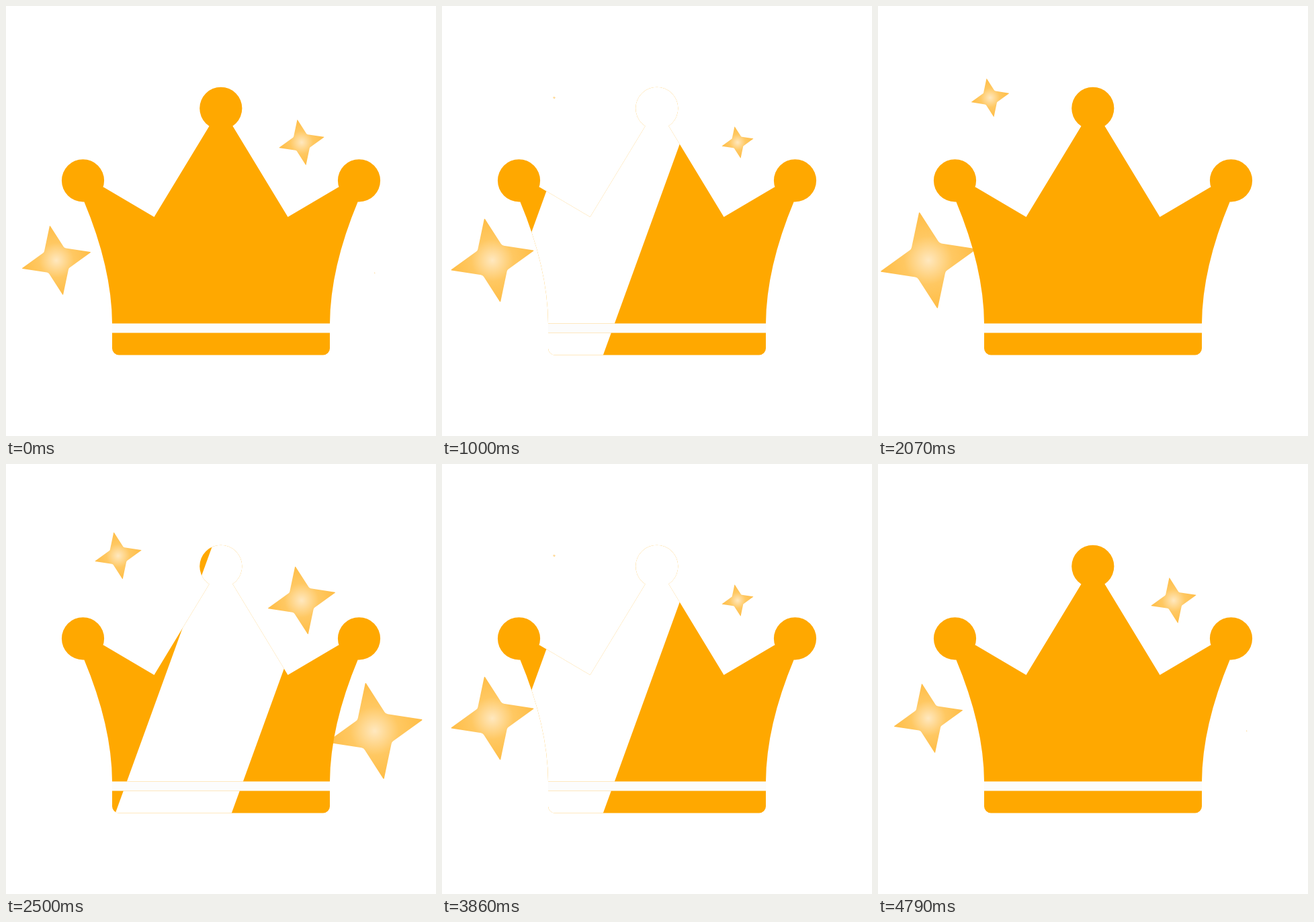
Animation of 640x640 px, one loop 4.87 s. Source, as an HTML page with a canvas:

```html
<!DOCTYPE html>
<html lang="en">
<head>
<meta charset="utf-8">
<title>Sparkling crown</title>
<style>
  html, body { margin: 0; width: 100%; height: 100%; overflow: hidden; background: #fff; }
  canvas { display: block; width: 640px; height: 640px; }
</style>
</head>
<body>
<canvas id="stage" width="640" height="640"></canvas>
<script>
const ctx = document.getElementById('stage').getContext('2d');

const LOOP = 4870;
const TICK = 1000 / 14;
const LAST_TICK = 67;
const GOLD = '#ffa800';

// Twinkle times are in steps; a tick is 1.5 steps and a cycle is 20.
const STEPS_PER_TICK = 1.5;
const CYCLE = 20;
const GROW = 6.8;
const SHRINK = 7;
const stars = [
  { x: 75, y: 378.5, start: -4.9, end: 10.75 },
  { x: 167, y: 136.5, start: 0.8, end: 15.9 },
  { x: 440, y: 203, start: 7.7, end: 23.3 },
  { x: 548.7, y: 397.3, start: 4.8, end: 20.1 }
];

// The gleam is a slanted band crossing the crown once every 20 ticks.
const SWEEP = { period: 20, speed: 96, width: 173, slope: 0.363, baseY: 519 };

function makeCrown() {
  const path = new Path2D();
  for (const [x, y] of [[319.8, 152.3], [114.5, 259.8], [525.5, 259.8]]) {
    path.moveTo(x + 31.6, y);
    path.arc(x, y, 31.6, 0, Math.PI * 2);
  }
  path.moveTo(114.5, 260);
  path.lineTo(145, 269.5);
  path.lineTo(220.5, 314);
  path.lineTo(303, 178);
  path.lineTo(337, 178);
  path.lineTo(419.5, 314);
  path.lineTo(495, 269.5);
  path.lineTo(525.5, 260);
  path.lineTo(523.8, 291);
  path.quadraticCurveTo(482.5, 390, 482, 472.5);
  path.lineTo(158, 472.5);
  path.quadraticCurveTo(157.5, 390, 116.2, 291);
  path.closePath();
  path.roundRect(158, 486.5, 324, 33, [0, 0, 10, 10]);
  return path;
}

function makeStar() {
  const points = [
    [-13.7, -72.5], [16.5, -25.5], [72, -17], [25.5, 16.5],
    [13.7, 72.5], [-16.5, 25.5], [-72, 17], [-25.5, -16.5]
  ];
  const path = new Path2D();
  path.moveTo(-19.6, -44.5);
  points.forEach(([x, y], i) => {
    const [nx, ny] = points[(i + 1) % points.length];
    path.arcTo(x, y, nx, ny, i % 2 ? 7 : 0.8);
  });
  path.closePath();
  return path;
}

function makeGlow() {
  const glow = ctx.createRadialGradient(0, 0, 0, 0, 0, 72);
  glow.addColorStop(0, '#ffe8bf');
  glow.addColorStop(0.5, '#ffc862');
  glow.addColorStop(1, '#ffbd46');
  return glow;
}

const crown = makeCrown();
const starShape = makeStar();
const glow = makeGlow();

function starScale(star, step) {
  const age = (((step - star.start) % CYCLE) + CYCLE) % CYCLE;
  const left = star.end - star.start - age;
  return Math.max(0, Math.min(1, age / GROW, left / SHRINK));
}

function drawStar(star, step) {
  const scale = starScale(star, step);
  if (scale === 0) return;
  ctx.save();
  ctx.translate(star.x, star.y);
  ctx.scale(scale, scale);
  ctx.fillStyle = glow;
  ctx.fill(starShape);
  ctx.restore();
}

function drawGleam(tick) {
  const right = 240 + SWEEP.speed * (tick % SWEEP.period - 14);
  const edge = (x, y) => ctx.lineTo(x + (SWEEP.baseY - y) * SWEEP.slope, y);
  ctx.save();
  ctx.clip(crown);
  ctx.beginPath();
  edge(right - SWEEP.width, 100);
  edge(right, 100);
  edge(right, 540);
  edge(right - SWEEP.width, 540);
  ctx.fillStyle = '#fff';
  ctx.fill();
  ctx.restore();
}

function draw(time) {
  let tick = Math.floor((time % LOOP + 5) / TICK);
  if (tick >= LAST_TICK) tick = 0;

  ctx.fillStyle = '#fff';
  ctx.fillRect(0, 0, 640, 640);
  for (const star of stars) drawStar(star, tick * STEPS_PER_TICK);
  ctx.fillStyle = '#fcfcfc';
  ctx.fillRect(158, 472.5, 324, 14);
  ctx.fillStyle = GOLD;
  ctx.fill(crown);
  drawGleam(tick);
}

const startTime = performance.now();
function loop() {
  draw(performance.now() - startTime);
  requestAnimationFrame(loop);
}
loop();
</script>
</body>
</html>
```
